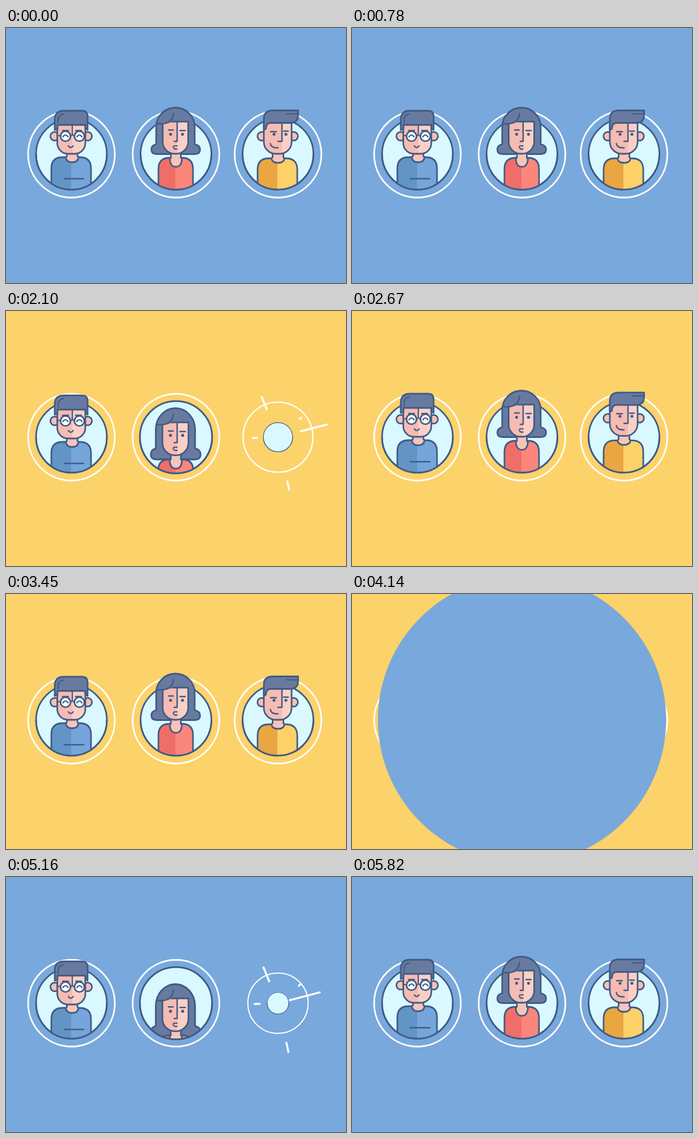
These frames come from a looping animation (600x450 px, 5850 ms). An HTML page:

```html
<!DOCTYPE html>
<html lang="en">
<head>
<meta charset="utf-8">
<title>Three avatars</title>
<style>
html, body { margin: 0; width: 100%; height: 100%; overflow: hidden; background: #79a8dc; }
svg { display: block; width: 100vw; height: 100vh; }
.ink { stroke: #3f5b85; stroke-width: 2.8; stroke-linecap: round; stroke-linejoin: round; }
.line { fill: none; }
.hair { fill: #687a9f; }
.dot { fill: #3f5b85; }
</style>
</head>
<body>
<svg id="stage" viewBox="0 0 600 450" xmlns="http://www.w3.org/2000/svg"></svg>
<script>
const LOOP = 5850, HALF = 3090, IRIS_START = 880, IRIS_END = 1220;
const BLUE = '#79a8dc', YELLOW = '#fcd26b', CY = 222.7, RADIUS = 62.5;
const stage = document.getElementById('stage');

const shape = (d, fill) => `<path class="ink" d="${d}" fill="${fill}"/>`;
const line = (d, w = 2.5) => `<path class="ink line" d="${d}" style="stroke-width:${w}"/>`;
const hair = d => `<path class="ink hair" d="${d}"/>`;
const dot = (x, y) => `<circle class="dot" cx="${x}" cy="${y}" r="2.6"/>`;
const ear = x => `<circle class="ink" cx="${x}" cy="191" r="7.7" fill="#f7c0b5"/>`;

// Hard-edged two-tone fill that splits at x
const twoTone = (id, x, left, right) =>
  `<linearGradient id="${id}" gradientUnits="userSpaceOnUse" x1="${x - 1}" x2="${x + 1}" y1="0" y2="0">
   <stop offset=".5" stop-color="${left}"/><stop offset=".5" stop-color="${right}"/></linearGradient>`;

const torso = (l, r, top, fill) =>
  shape(`M${l} 320V${top + 20}Q${l} ${top} ${l + 20} ${top}H${r - 20}Q${r} ${top} ${r} ${top + 20}V320Z`, fill);

// Neck that widens into a round neckline
const neck = (l, r, shoulder, bottom) => {
  const mid = (l + r) / 2;
  return shape(`M${l} 214V${shoulder - 2}L${l - 2} ${shoulder}Q${l - 1} ${bottom} ${mid} ${bottom}` +
    `Q${r + 1} ${bottom} ${r + 2} ${shoulder}L${r} ${shoulder - 2}V214Z`, '#f7c4b9');
};
const face = (l, r, top, round, fill) =>
  shape(`M${l} ${top}V${222 - round}A${round} ${round} 0 0 0 ${l + round} 222H${r - round}A${round} ${round} 0 0 0 ${r} ${222 - round}V${top}Z`, fill);

const lens = x => `<circle class="ink" cx="${x}" cy="191" r="8.8" fill="#fff"/>` +
  line(`M${x - 4.5} 192Q${x} 185.5 ${x + 4.5} 192`, 2.2);

const glassesMan =
  torso(80, 150, 228, 'url(#shirt0)') + line('M103 266H137') +
  neck(107.5, 126, 228, 237) + ear(86) + ear(144) +
  face(90.5, 140, 166, 19, 'url(#face0)') +
  hair('M86 180V162Q86 146 102 146H134Q144 146 144 156V180L140 177V171H91V178Z') +
  line('M92 167V162Q92 153 101 152', 2.2) +
  line('M117 171V189', 2.2) + line('M100 181H110M123 181H133') +
  lens(105) + lens(129.5) + line('M114 191Q117 187 120.5 191M91 190H96M138 190H140', 2.2) +
  line('M110 208Q114 214 118.5 208', 2.3);

const woman =
  '<g class="tress">' +
  hair('M265 205V174.5A34 34 0 0 1 333 174.5V205Q342.5 207 342.5 214.5Q342.5 222.5 333 222.5H266Q256.5 222.5 256.5 214.5Q256.5 207 265 205Z') +
  '</g>' +
  torso(269, 330, 229, 'url(#shirt1)') + neck(291, 308.5, 231, 245) +
  face(276.5, 321.5, 165, 21.5, 'url(#face1)') +
  '<path class="hair" d="M274 170H277Q289 168 294 165H323V156H274Z"/>' +
  line('M266 169H277Q294 167 295.5 151M293 165H321.5') +
  line('M302 166V200H297') + dot(290.5, 187.5) + dot(311.5, 187.5) +
  line('M287 180H295M307 181H316') +
  line('M302 208H297Q294 209 296 212Q298 214.5 302 213.5', 2.2);

const youngMan =
  torso(444, 514, 230, 'url(#shirt2)') + neck(470.5, 489.5, 230, 238) +
  ear(451.5) + ear(507.5) +
  face(455, 504, 166, 21, 'url(#face2)') +
  hair('M455 180V160Q455 145.5 471 145.5H515.5V153Q515.5 167.5 502 167.5H466Q459 168 458.5 178Z') +
  line('M495 151.5H514', 2.2) +
  line('M487 169V200H480') + dot(473, 187.5) + dot(494, 187.5) +
  line('M467 183H477M490 182H498') + line('M466.5 204Q468 212 480 211.5');

// Rays: [angle, end radius, start radius, delay]; dip: how far the figure sinks before it settles
const people = [
  { x: 115.5, start: 1320, dip: 3, art: glassesMan, skin: 117, mid: 115, shirt: ['#6295c5', '#75a5da'],
    rays: [[135, 118, 0, 0], [8, 70, 0, 0], [40, 101, 30, .1], [-105, 97, 20, .1], [-165, 62, 25, .1]] },
  { x: 300, start: 1680, dip: 2, art: woman, skin: 302, mid: 299.5, shirt: ['#f06e69', '#fa867c'],
    rays: [[52, 100, 40, 0], [-98, 98, 20, 0], [-160, 90, 0, 0], [130, 60, 20, 0], [-30, 58, 30, 0]] },
  { x: 480, start: 1980, dip: 0, art: youngMan, skin: 487, mid: 479, shirt: ['#eaa741', '#fdd168'],
    rays: [[-112, 98, 21, 0], [-40, 59, 41, 0], [-14.5, 124, 1, 0], [178, 55, 20, 0], [78, 110, 54, 0]] }
];

const defs = people.map((p, i) =>
  twoTone('shirt' + i, p.mid, ...p.shirt) + twoTone('face' + i, p.skin, '#f6bbb1', '#fad0c6')).join('');

stage.innerHTML = `<defs>${defs}
  <clipPath id="porthole"><path d="M-62.5 -200H62.5V0A62.5 62.5 0 0 1 -62.5 0Z"/></clipPath></defs>
  <rect id="back" width="600" height="450"/>` +
  people.map(p => `<g class="person" transform="translate(${p.x} ${CY})">
    <circle class="ring" r="76.5" fill="none" stroke="#fff" stroke-width="2.9"/>
    <g class="badge">
      <circle class="ink" r="${RADIUS}" fill="#daf8ff"/>
      <g clip-path="url(#porthole)"><g class="body"><g transform="translate(${-p.x} ${-CY})">${p.art}</g></g></g>
      <path class="ink line" d="M${RADIUS} 0A${RADIUS} ${RADIUS} 0 0 1 ${-RADIUS} 0"/>
    </g>
    <path class="burst" fill="none" stroke="#fff" stroke-width="3.5" stroke-linecap="round"/>
  </g>`).join('') +
  '<circle id="iris" cx="300" cy="222"/>';

const back = document.getElementById('back');
const iris = document.getElementById('iris');
const tress = document.querySelector('.tress');
document.querySelectorAll('.person').forEach((g, i) => {
  const part = name => g.querySelector('.' + name);
  Object.assign(people[i], { g, ring: part('ring'), badge: part('badge'), body: part('body'), burst: part('burst') });
});

const clamp = v => Math.max(0, Math.min(1, v));
const easeInOut = v => (1 - Math.cos(Math.PI * clamp(v))) / 2;
const easeOut = v => 1 - (1 - clamp(v)) ** 2;

// Eased interpolation through [time, value] keys
function track(t, keys) {
  let value = keys[0][1];
  for (let i = 1; i < keys.length; i++) {
    const [t0, v0] = keys[i - 1], [t1, v1] = keys[i];
    if (t >= t0) value = v0 + (v1 - v0) * easeInOut((t - t0) / (t1 - t0));
  }
  return value;
}

function burstPath(rays, t) {
  const u = (t + 30) / 322;
  return rays.map(([deg, end, begin, delay]) => {
    const span = end - begin, lag = .14 + .0012 * span;
    const at = v => begin + span * easeOut(v - delay);
    const head = at(u), tail = at(u - lag);
    if (head - tail < .6) return '';
    const c = Math.cos(deg * Math.PI / 180), s = Math.sin(deg * Math.PI / 180);
    return `M${tail * c} ${tail * s}L${head * c} ${head * s}`;
  }).join('');
}

function drawPerson(p, t) {
  p.g.style.display = t < 0 ? 'none' : '';
  if (t < 0) return;
  const ring = track(t, [[0, .5], [211, 1]]);
  const badge = track(t, [[-66, 0], [360, 1.02], [430, 1.02], [640, 1]]);
  const rise = track(t, [[154, 150], [560, -10], [740, p.dip], [790, p.dip], [940, 0]]);
  p.ring.setAttribute('transform', `scale(${ring})`);
  p.badge.setAttribute('transform', `scale(${badge})`);
  p.body.setAttribute('transform', `translate(0 ${rise})`);
  p.burst.setAttribute('d', burstPath(p.rays, t));
  // Long hair trails behind the rising head
  if (p.art === woman)
    tress.setAttribute('transform', `translate(0 140) scale(1 ${1 + rise * .0025}) translate(0 -140)`);
}

function draw(t) {
  const blue = t < IRIS_END || t >= IRIS_END + HALF;
  const wipe = t < IRIS_END ? t : t - HALF;
  const cast = t < IRIS_END ? t + LOOP - HALF : t < IRIS_END + HALF ? t : t - HALF;
  back.setAttribute('fill', blue ? BLUE : YELLOW);
  people.forEach(p => drawPerson(p, cast - p.start));
  const open = wipe >= IRIS_START && wipe < IRIS_END;
  iris.setAttribute('r', open ? 504 * easeInOut((wipe - IRIS_START) / (IRIS_END - IRIS_START)) : 0);
  iris.setAttribute('fill', blue ? YELLOW : BLUE);
}

const origin = performance.now();
function tick() {
  draw((performance.now() - origin) % LOOP);
  requestAnimationFrame(tick);
}
tick();
</script>
</body>
</html>
```
